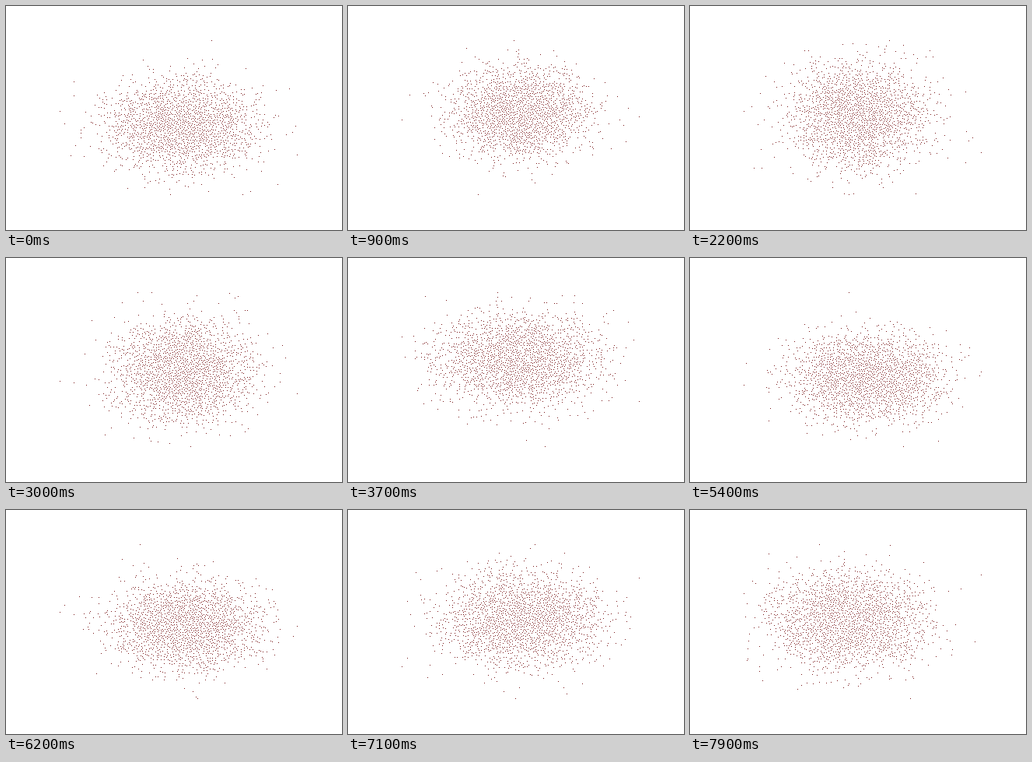
Write a matplotlib script that moves like this. It is 432x288 px and loops after 8 s.

```python
import numpy as np
import matplotlib.pyplot as plt
from matplotlib.animation import FuncAnimation

W, H, DPI = 432, 288, 72
STEPS, INTERVAL = 80, 100
LEFT, RIGHT, TOP, BOTTOM = 68, 373, 44, 242
SAMPLES = 3500
GAP = 2  # pixels around a dot that stay free
INK = "#7a1a1c"

oy, ox = np.mgrid[-GAP:GAP + 1, -GAP:GAP + 1]
DISC = ox**2 + oy**2 <= GAP**2


def fit(v, lo, hi):
    """Scale samples so that they just fill lo..hi, as whole pixels."""
    v = lo + (v - v.min()) * (hi - lo) / (v.max() - v.min())
    return v.round().astype(int)


def cloud(step):
    """A fresh normal cloud, thinned so that its core is evenly filled."""
    rng = np.random.default_rng(700 + step)
    gx, gy = rng.standard_normal((2, SAMPLES))
    x, y = fit(gx, LEFT, RIGHT), fit(gy, TOP, BOTTOM)
    taken = np.zeros((H, W), bool)
    dots = []
    for px, py in zip(x, y):
        if not taken[py, px]:
            taken[py - GAP:py + GAP + 1, px - GAP:px + GAP + 1] |= DISC
            dots.append((px + 0.5, py + 0.5))
    return np.array(dots)


fig = plt.figure(figsize=(W / DPI, H / DPI), dpi=DPI, facecolor="white")
ax = fig.add_axes([0, 0, 1, 1])
ax.set(xlim=(0, W), ylim=(H, 0))
ax.axis("off")
points, = ax.plot([], [], ",", color=INK)


def draw(i):
    # the first cloud is held for two steps
    points.set_data(*cloud(max(i, 1)).T)
    return points,


anim = FuncAnimation(fig, draw, frames=STEPS, interval=INTERVAL,
                     init_func=lambda: draw(0), repeat=True, repeat_delay=0, blit=False)
plt.show()
```
